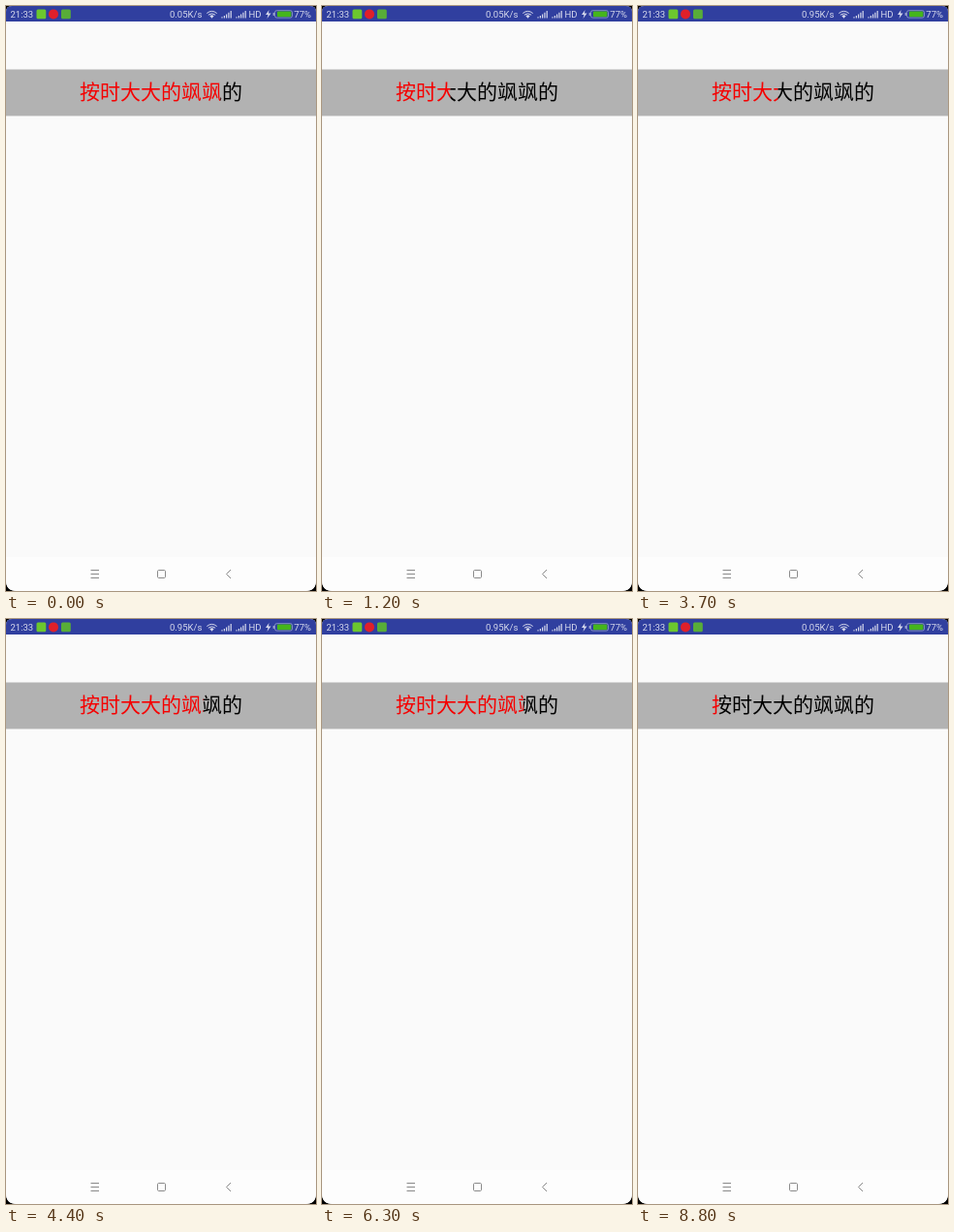
These frames come from a looping animation (320 by 604 pixels, 8900 ms). An HTML page:

```html
<!DOCTYPE html>
<html lang="zh-CN">
<head>
<meta charset="utf-8">
<title>Text colour sweep</title>
<style>
  html, body { margin: 0; width: 100%; height: 100%; overflow: hidden; background: #000; }
  svg { display: block; width: 100%; height: 100%; }
  .status { font: 9.5px Roboto, sans-serif; fill: #d6d9ec; }
  .lyric { font: 21px "Noto Sans CJK SC", "Noto Sans CJK", sans-serif; }
  .line { fill: none; stroke: #8a8a8a; stroke-width: 1; }
</style>
</head>
<body>
<svg viewBox="0 0 320 604">
  <defs>
    <clipPath id="screen">
      <path d="M0 6Q0 0 6 0H314Q320 0 320 6V593Q320 604 309 604H11Q0 604 0 593Z"/>
    </clipPath>
    <clipPath id="sweep"><rect id="done" x="70" y="66" width="0" height="47"/></clipPath>
    <clipPath id="rest"><rect id="todo" x="70" y="66" width="0" height="47"/></clipPath>
    <path id="signal" d="M.4 12.5V11.2H1.6V12.5ZM2.8 12.5V10H4V12.5ZM5 12.5V8.4H6.2V12.5ZM7.3 12.5V6.8H8.5V12.5ZM9.6 12.5V5H10.8V12.5Z"/>
    <text id="words" class="lyric" x="76" y="96">按时大大的飒飒的</text>
  </defs>
  <g clip-path="url(#screen)">
    <rect width="320" height="604" fill="#fafafa"/>
    <rect y="569" width="320" height="35" fill="#fdfdfd"/>

    <rect width="320" height="16" fill="#303f9f"/>
    <g class="status">
      <text x="4.5" y="12">21:33</text>
      <text id="speed" x="169" y="12">0.05K/s</text>
      <text x="250.5" y="12">HD</text>
      <text x="297.3" y="12">77%</text>
      <use href="#signal" x="222"/>
      <use href="#signal" x="237"/>
      <path d="M271.5 4L268 9H270.5L269.5 13L273.5 7.5H271Z"/>
      <path d="M210.4 10.2Q212.5 8.4 214.6 10.2L212.5 12.7Z"/>
    </g>
    <path d="M207.3 7.5Q212.5 3.3 217.7 7.5M208.9 9.2Q212.5 6.4 216.1 9.2" fill="none" stroke="#d6d9ec"/>
    <rect x="31.5" y="3.5" width="9.8" height="9.8" rx="1.5" fill="#6cc72e"/>
    <circle cx="49" cy="8.4" r="5" fill="#e0202a"/>
    <rect x="57" y="3.5" width="9.8" height="9.8" rx="1.5" fill="#58ad38"/>
    <rect x="277.5" y="4.7" width="18" height="7.4" rx="2" fill="none" stroke="#9aa2cf" stroke-width=".8"/>
    <rect x="275.6" y="6.9" width="1.4" height="3" fill="#9aa2cf"/>
    <rect x="280" y="5.6" width="14.4" height="5.6" rx="1" fill="#45b51c"/>

    <rect y="65.5" width="320" height="48" fill="#b2b2b2"/>
    <use href="#words" fill="#000" clip-path="url(#rest)"/>
    <use href="#words" fill="#f50000" clip-path="url(#sweep)"/>

    <g class="line">
      <path d="M87.5 582.5H96M87.5 586.5H96M87.5 590.5H96"/>
      <rect x="156.5" y="582.5" width="8" height="8" rx="1.2"/>
      <path d="M232 582L227.5 586.5L232 591"/>
    </g>
  </g>
</svg>
<script>
  const LOOP = 8900, STEP = 100, SWEEP = 3000, EMPTY_AT = 2379;
  const LEFT = 76, WIDTH = 168;
  const byId = id => document.getElementById(id);
  const done = byId("done"), todo = byId("todo"), speed = byId("speed");

  function draw(now) {
    const t = Math.max(STEP, Math.floor(now % LOOP / STEP) * STEP);
    // Eased sweep: full to empty to full, one way per SWEEP
    const progress = 0.5 - 0.5 * Math.cos(Math.PI * (t - EMPTY_AT) / SWEEP);
    const edge = LEFT + WIDTH * progress;
    done.setAttribute("width", edge - 70);
    todo.setAttribute("x", edge);
    todo.setAttribute("width", 250 - edge);
    speed.textContent = t >= 2900 && t < 6900 ? "0.95K/s" : "0.05K/s";
  }

  const start = performance.now();
  function tick() {
    draw(performance.now() - start);
    requestAnimationFrame(tick);
  }
  tick();
</script>
</body>
</html>
```
